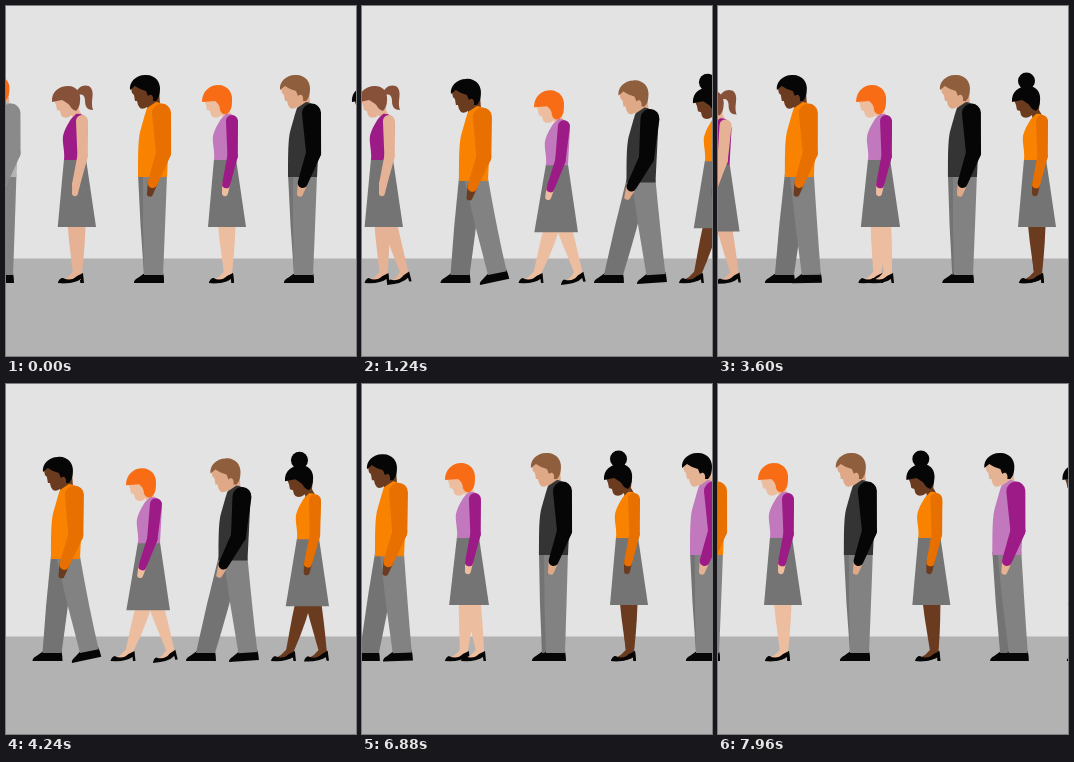
These frames come from a looping animation (350x350 px, 8000 ms). An HTML page with a canvas:

```html
<!DOCTYPE html>
<html lang="en">
<head>
<meta charset="utf-8">
<title>Waiting line</title>
<style>
html, body { margin: 0; width: 100%; height: 100%; overflow: hidden; background: #e3e3e3; }
canvas { display: block; width: 350px; height: 350px; }
</style>
</head>
<body>
<canvas id="stage"></canvas>
<script>
const canvas = document.getElementById('stage');
const ctx = canvas.getContext('2d');
const dpr = window.devicePixelRatio || 1;
canvas.width = canvas.height = 350 * dpr;

const LOOP = 8000, GAP = 75, RAD = Math.PI / 180;
const clamp = (v, a, b) => Math.max(a, Math.min(b, v));
const smooth = (t, a, b) => { const u = clamp((t - a) / (b - a), 0, 1); return u * u * (3 - 2 * u); };

// One stride, sampled at even phases from -3 to 8
const stride = {
  front: [0, 4, 16, 36, 46, 46.5, 49.5, 50.5, 52, 52, 52, 52],
  body: [0, 1, 9, 15, 17.5, 24, 35, 49, 54, 53.5, 52, 52],
  rear: [0, 0, 0, 3, 3, 4, 10, 28, 45, 52, 52, 52],
  arm: [0, 0, 0, 1, 8, 7, 1, 0, 0, 0, 0, 0]
};

// Moments when the line moves up: anchor time, phase of the leader there, ms per phase
const moves = [
  { at: 1240, phase: 4, tempo: 190 },
  { at: 4240, phase: 4, tempo: 190 },
  { at: 6880, phase: 1, tempo: 122 }
];

function sample(list, phase) {
  const p = clamp(phase + 3, 0, list.length - 1);
  const i = Math.min(Math.floor(p), list.length - 2), u = p - i;
  const at = n => list[clamp(n, 0, list.length - 1)];
  const b = at(i), c = at(i + 1);
  if (b === c) return b;
  const m0 = (c - at(i - 1)) / 2, m1 = (at(i + 2) - b) / 2;
  const u2 = u * u, u3 = u2 * u;
  return (2 * u3 - 3 * u2 + 1) * b + (u3 - 2 * u2 + u) * m0 + (3 * u2 - 2 * u3) * c + (u3 - u2) * m1;
}

function poseAt(t, order) {
  const pose = { front: 0, body: 0, rear: 0, arm: 0 };
  for (const m of moves) {
    const phase = m.phase - order + (t - m.at) / m.tempo;
    for (const key in pose) pose[key] += sample(stride[key], phase);
  }
  return pose;
}

const shapes = {
  manFace: 'M-3 82 L-2 87 L0 89 L1 95 L3 95 L4 99 L6 102 Q9 104 13 101 L15 106 L26 98 L25 84 L12 74Z',
  manHair: 'M-4 84 C-5 76 2 69 11 69 C20 68 26 75 26 82 C26 88 25 92 22 95 L19 95 C20 90 17 87 14 90 L12 85 C8 84 4 82 1 80Z',
  manTorso: 'M13 102 L22 96 C30 97 35 103 36 110 L33 171 L4 171 C4 150 4 135 6 126 C9 115 11 108 13 102Z',
  manShoe: 'M0 277 Q0 274 4 272 L11 267 L29 267 Q30 272 30 277Z',
  womanFace: 'M-5 94 L-3 99 L-2 104 L1 105 L2 109 Q4 113 10 111 L13 109 L14 116 L24 111 L20 104 L21 92 L8 84Z',
  womanTorso: 'M12 113 L17 108 C24 107 28 112 29 118 L27 154 L5 154 C6 145 3 137 4 130 C6 122 9 118 12 113Z',
  womanFoot: 'M15 266 L23 266 L24 273 L18 275 L3 275 L10 271Z',
  womanShoe: 'M0 277 Q1 273 4 272 Q12 276 18 270 L24 267 L25 277 L22.5 277 L22 273 Q16 278 0 277Z',
  bob: 'M-7 96 C-7 85 1 79 9 79 C19 79 24 87 23 95 C23 101 22 105 18 108 C14 109 12 107 11 104 C11 100 9 97 6 95 C3 95 -2 96 -7 96Z',
  cap: 'M-7 96 C-8 86 0 80 9 80 C18 80 22 87 21 95 C21 99 19 103 17 105 C14 104 12 102 11 100 C9 97 6 96 3 94Z',
  tail: 'M17 88 C18 80 28 77 32 82 C36 88 31 95 34 104 C27 104 26 99 26 94 C26 89 22 87 18 90Z',
  bun: 'M-1 75 A8.5 8.5 0 1 1 16 75 A8.5 8.5 0 1 1 -1 75Z'
};
for (const key in shapes) shapes[key] = new Path2D(shapes[key]);

const BLACK = '#060606', PALE = '#e6b295', BROWN = '#6b3b20';
const ORANGE = '#f98300', DEEP = '#e87000', PINK = '#c278bd', PURPLE = '#9c1b87';
const people = [
  { slot: -1, order: -.4, man: true, skin: PALE, hair: '#f26a16', top: '#b4b4b4', sleeve: '#8a8a8a' },
  { slot: 0, skin: PALE, hair: '#875139', style: 'tail', top: PURPLE, sleeve: PALE },
  { slot: 1, man: true, skin: BROWN, hair: BLACK, top: ORANGE, sleeve: DEEP },
  { slot: 2, skin: '#edbd9f', hair: '#f96c16', style: 'bob', top: PINK, sleeve: PURPLE },
  { slot: 3, man: true, skin: '#dfa988', hair: '#8e5e3d', top: '#343434', sleeve: BLACK, checksWatch: true },
  { slot: 4, skin: BROWN, hair: BLACK, style: 'bun', top: ORANGE, sleeve: DEEP },
  { slot: 5, man: true, skin: '#e3b394', hair: BLACK, top: PINK, sleeve: PURPLE },
  { slot: 6, skin: BROWN, hair: BLACK, style: 'bun', top: PINK, sleeve: PURPLE }
];

function fill(shape, color) {
  ctx.fillStyle = color;
  ctx.fill(typeof shape === 'string' ? shapes[shape] : shape);
}

function poly(points, color) {
  const path = new Path2D();
  points.forEach(([x, y]) => path.lineTo(x, y));
  path.closePath();
  fill(path, color);
}

// Tapered segment with round ends
function limb(a, b, ra, rb, color) {
  const n = Math.atan2(b[1] - a[1], b[0] - a[0]) + Math.PI / 2;
  const path = new Path2D();
  path.arc(a[0], a[1], ra, n, n + Math.PI);
  path.arc(b[0], b[1], rb, n + Math.PI, n);
  path.closePath();
  fill(path, color);
}

const reach = (p, len, deg) => [p[0] - len * Math.sin(deg * RAD), p[1] + len * Math.cos(deg * RAD)];

function drawArm(p, swing, fold) {
  const s = p.man
    ? { at: [27.5, 107], up: 40, low: 32, r: [9.5, 7.5, 5], upper: -3 + 9 * fold, fore: 20 + 92 * fold }
    : { at: [23, 115], up: 35, low: 29, r: [6, 5.2, 4], upper: -1, fore: 13 };
  const elbow = reach(s.at, s.up, s.upper + swing);
  const wrist = reach(elbow, s.low, s.fore + swing);
  const tip = reach(wrist, p.man ? 11 : 9, s.fore + swing - 6);
  limb(wrist, tip, p.man ? 5 : 4, 3, p.skin);
  limb(s.at, elbow, s.r[0], s.r[1], p.sleeve);
  limb(elbow, wrist, s.r[1], s.r[2], p.sleeve);
}

function drawLeg(p, hip, foot, tilt, drop, color) {
  const sin = Math.sin(tilt * RAD), cos = Math.cos(tilt * RAD);
  const sink = tilt ? Math.min(2, tilt / 4) : 0;
  // Foot turns about its toe
  const turn = (x, y) => [foot + x * cos + (y - 277) * sin, 277 + sink - x * sin + (y - 277) * cos];
  ctx.save();
  ctx.translate(foot, 277 + sink);
  ctx.rotate(-tilt * RAD);
  ctx.translate(0, -277);
  if (!p.man) fill('womanFoot', p.skin);
  fill(p.man ? 'manShoe' : 'womanShoe', BLACK);
  ctx.restore();
  const [l, r] = p.man ? [turn(10, 269), turn(29, 269)] : [turn(15, 267), turn(23, 267)];
  const [x0, x1, y] = [hip[0], hip[1], (p.man ? 168 : 200) + drop];
  const path = new Path2D();
  path.moveTo(x0, y);
  path.lineTo(x1, y);
  const my = (y + l[1]) / 2;
  const bulge = p.man ? 0 : 1.5;
  path.quadraticCurveTo((x1 + r[0]) / 2 + bulge, my + 5, r[0], r[1]);
  path.lineTo(l[0], l[1]);
  path.quadraticCurveTo((x0 + l[0]) / 2 - 1, my, x0, y);
  fill(path, color);
}

function drawPerson(p, t) {
  const pose = poseAt(t, p.order ?? p.slot);
  const x = 53 + GAP * p.slot;
  if (x - pose.front > 400 || x - pose.rear < -90) return;
  const { body, front, rear } = pose;
  const drop = Math.max(0, rear - front, front - rear - 30) * .42;
  const tilt = clamp((body - rear - 10) * .8, 0, 18);
  ctx.save();
  ctx.translate(x, 0);
  const hips = p.man ? [[4, 27], [9, 33]] : [[7, 24], [9, 27]];
  const hip = i => hips[i].map(v => v - body);
  const legs = p.man ? ['#737373', '#828282'] : [p.skin, p.skin];
  drawLeg(p, hip(0), -front, 0, drop, legs[0]);
  drawLeg(p, hip(1), -rear, tilt, drop, legs[1]);

  ctx.translate(-body, drop);
  if (p.man) {
    fill('manFace', p.skin);
    fill('manHair', p.hair);
    fill('manTorso', p.top);
  } else {
    const lead = Math.max(0, front - body) * .25;
    poly([[5, 153], [27, 153], [37, 221], [-1 - lead, 221]], '#747474');
    fill('womanFace', p.skin);
    if (p.style !== 'bob') fill(p.style, p.hair);
    fill(p.style === 'bob' ? 'bob' : 'cap', p.hair);
    fill('womanTorso', p.top);
  }
  const fold = p.checksWatch ? smooth(t, 4760, 5240) - smooth(t, 6220, 6720) : 0;
  drawArm(p, pose.arm, fold);
  ctx.restore();
}

function draw(t) {
  ctx.setTransform(dpr, 0, 0, dpr, 0, 0);
  ctx.fillStyle = '#e3e3e3';
  ctx.fillRect(0, 0, 350, 350);
  ctx.fillStyle = '#b2b2b2';
  ctx.fillRect(0, 252.5, 350, 97.5);
  people.forEach(p => drawPerson(p, t));
}

const start = performance.now();
function tick() {
  draw((performance.now() - start) % LOOP);
  requestAnimationFrame(tick);
}
tick();
</script>
</body>
</html>
```
